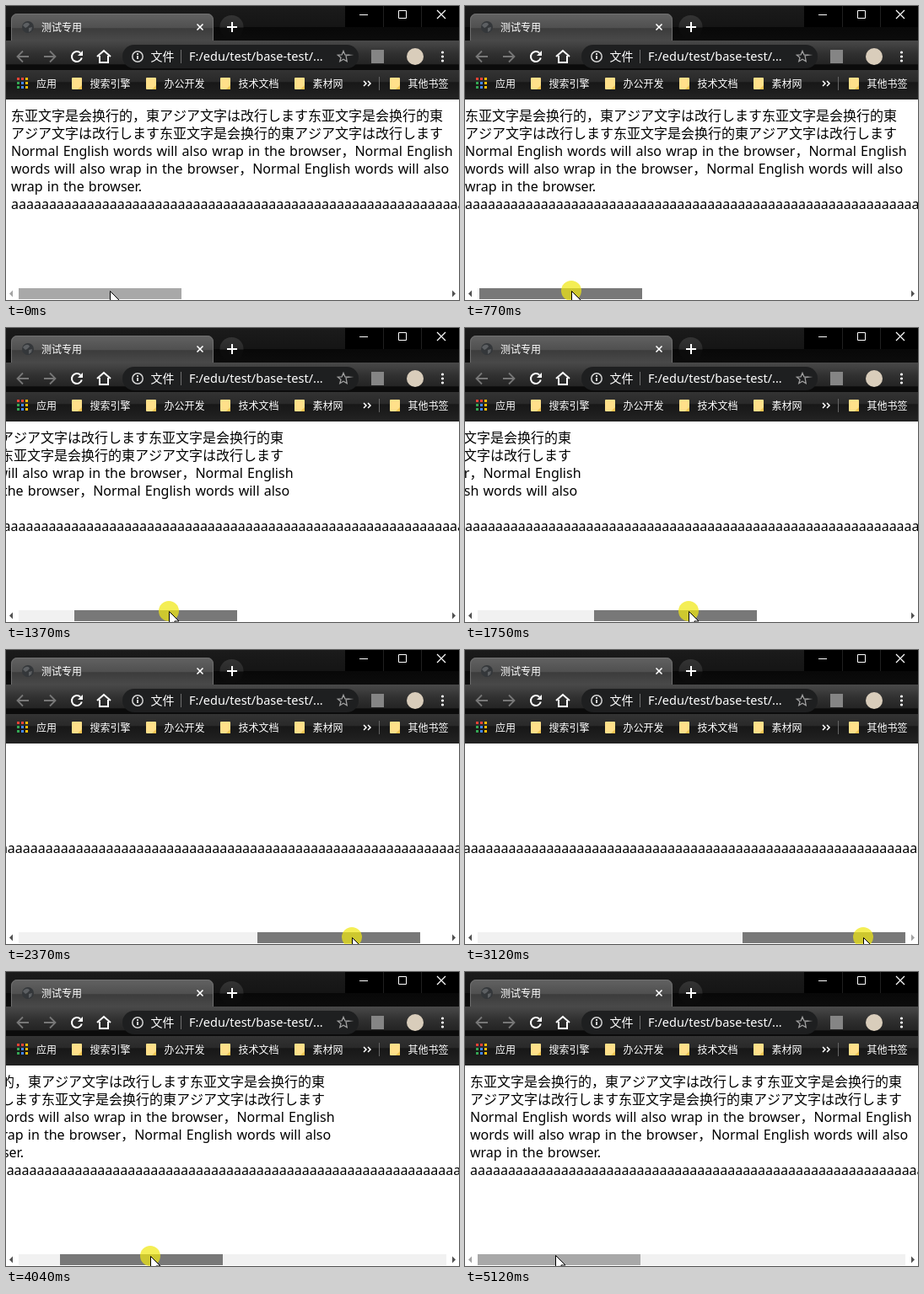
Write an HTML page with a canvas that moves like this. It is 537 px wide and 349 px high and loops after 6600 ms.

```html
<!DOCTYPE html>
<html lang="zh-CN">
<head>
<meta charset="utf-8">
<title>测试专用</title>
<style>
html, body { margin: 0; width: 100%; height: 100%; overflow: hidden; background: #fff; }
canvas { display: block; }
</style>
</head>
<body>
<canvas id="stage" width="537" height="349"></canvas>
<script>
const W = 537, H = 349, LOOP = 6600;
const ctx = document.getElementById('stage').getContext('2d');
const FONT = '"Noto Sans", "Noto Sans CJK SC", "Noto Sans CJK", sans-serif';

const TRACK = { left: 15, right: 522, top: 335, height: 13 };
const THUMB_W = 193, MAX_THUMB = TRACK.right - THUMB_W;
const MAX_SCROLL = 888;
const PRESS = 450, RELEASE = 5120;

const LINES = [
  '东亚文字是会换行的，東アジア文字は改行します东亚文字是会换行的東',
  'アジア文字は改行します东亚文字是会换行的東アジア文字は改行します',
  'Normal English words will also wrap in the browser，Normal English',
  'words will also wrap in the browser，Normal English words will also',
  'wrap in the browser.',
  'a'.repeat(158)
];

// time, pointer x, pointer y, thumb x
const PATH = [
  [0, 123, 338, 15], [690, 123, 338, 15], [770, 126, 338, 17],
  [1070, 145, 337, 34.7], [1370, 192, 336, 81], [1750, 264, 336, 153],
  [2140, 357, 339, 246], [2370, 413, 341, 302], [2500, 446, 341, 329],
  [2660, 480, 341, 329], [3040, 480, 341, 329], [3120, 472, 341, 329],
  [3270, 438, 340, 326], [3500, 372, 339, 262], [3730, 290, 338, 182],
  [4040, 171, 337, 64.5], [4270, 133, 337, 26], [4430, 123, 337, 15],
  [4580, 119, 336, 15], [4810, 107, 336, 15], [LOOP, 107, 336, 15]
];

// bursts of discrete pointer updates: start, interval, count
const BURSTS = [[0, 1, 1], [770, 75.6, 26], [3120, 76.67, 16], [4430, 1, 1], [4580, 76.67, 4]];

function snap(t) {
  const [start, gap, count] = BURSTS.filter(b => b[0] <= t).pop();
  return start + gap * Math.min(count - 1, Math.floor((t - start + 5) / gap));
}

function sample(t) {
  const i = Math.max(1, PATH.findIndex(p => p[0] >= t));
  const a = PATH[i - 1], b = PATH[i];
  const k = (t - a[0]) / (b[0] - a[0]);
  const [, x, y, thumb] = a.map((v, j) => v + (b[j] - v) * k);
  return { x: Math.round(x), y: Math.round(y), thumb };
}

function rect(x, y, w, h, fill) {
  ctx.fillStyle = fill;
  ctx.fillRect(x, y, w, h);
}

function round(x, y, w, h, r, fill) {
  ctx.beginPath();
  ctx.roundRect(x, y, w, h, r);
  ctx.fillStyle = fill;
  ctx.fill();
}

function disc(x, y, r, fill) {
  ctx.beginPath();
  ctx.arc(x, y, r, 0, Math.PI * 2);
  ctx.fillStyle = fill;
  ctx.fill();
}

function ring(x, y, r, color, width) {
  ctx.beginPath();
  ctx.arc(x, y, r, 0, Math.PI * 2);
  ctx.strokeStyle = color;
  ctx.lineWidth = width;
  ctx.stroke();
}

function shape(d, x, y, color, width) {
  const path = new Path2D(d);
  ctx.save();
  ctx.translate(x, y);
  if (width) {
    ctx.strokeStyle = color;
    ctx.lineWidth = width;
    ctx.stroke(path);
  } else {
    ctx.fillStyle = color;
    ctx.fill(path);
  }
  ctx.restore();
}

function text(str, x, y, size, color = '#fff') {
  ctx.font = `${size}px ${FONT}`;
  ctx.fillStyle = color;
  ctx.fillText(str, x, y);
}

function shade(y0, y1, ...stops) {
  const g = ctx.createLinearGradient(0, y0, 0, y1);
  stops.forEach(([at, color]) => g.addColorStop(at, color));
  return g;
}

function drawTabs() {
  rect(0, 0, W, 41, shade(0, 41, [0, '#1b1b1b'], [.6, '#151515'], [.62, '#080808'], [1, '#0c0c0c']));
  round(6, 9, 240, 36, [7, 7, 0, 0], shade(9, 42, [0, '#626262'], [.5, '#505050'], [.54, '#3c3c3c'], [1, '#4a4a4a']));
  ctx.beginPath();
  ctx.roundRect(6.5, 9.5, 239, 36, [7, 7, 0, 0]);
  ctx.strokeStyle = '#707070';
  ctx.lineWidth = 1;
  ctx.stroke();

  disc(26, 25, 7, '#34373a');
  shape('M-6-2C-3-6 1-6 2-3L-1 0L-3 1ZM1 1L5 0L4 4L1 6Z', 26, 25, '#5c5f62');
  text('测试专用', 42, 30, 12);
  shape('M-3.5-3.5L3.5 3.5M3.5-3.5L-3.5 3.5', 230, 25, '#fff', 1.6);
  disc(267.5, 25, 14, shade(11, 39, [0, '#343434'], [.5, '#292929'], [.54, '#0c0c0c'], [1, '#0c0c0c']));
  shape('M-6 0H6M0-6V6', 268, 25, '#fff', 2);

  rect(402, 0, 135, 25, '#000');
  rect(447, 0, 1, 25, '#202020');
  rect(492, 0, 1, 25, '#202020');
  rect(419, 10, 10, 1, '#fff');
  shape('M-4.5-4.5H4.5V4.5H-4.5Z', 470, 10, '#fff', 1);
  shape('M-5-5L5 5M5-5L-5 5', 516, 10, '#fff', 1.2);
}

function drawToolbar() {
  rect(0, 41, W, 35, shade(41, 76, [0, '#494949'], [.45, '#303030'], [.8, '#242424'], [.82, '#0b0b0b'], [1, '#0b0b0b']));
  const arrow = 'M7 0H-6M0-6.5L-6.5 0L0 6.5';
  shape(arrow, 20, 60, '#777', 1.8);
  shape('M-7 0H6M0-6.5L6.5 0L0 6.5', 52, 60, '#777', 1.8);
  shape('M4.2-4.2A6 6 0 1 0 5.8 1.5', 84, 60, '#fff', 2);
  shape('M7-7V-1H1Z', 84, 60, '#fff');
  shape('M-8 0L0-7L8 0M-5-1V7H5V-1', 116, 60, '#fff', 2);

  round(138, 46, 280, 28, 14, '#1e1f20');
  ring(156, 60, 6.2, '#d4d4d4', 1.5);
  rect(155, 59, 2, 4, '#d4d4d4');
  rect(155, 56, 2, 2, '#d4d4d4');
  text('文件', 171.5, 65, 14);
  rect(207, 52, 1, 16, '#707070');
  text('F:/edu/test/base-test/...', 217, 65, 14.5);
  shape('M0-6.5L1.9-2.1L6.6-1.8L3-1.2L4.2 5.7L0 3.2L-4.2 5.7L-3 1.2L-6.6-1.8L-1.9-2.1Z', 400, 60, '#a0a0a0', 1.3);

  rect(433, 52, 15, 16, '#858585');
  disc(485, 60, 10, '#d9cdbb');
  for (const y of [55, 60, 65]) disc(517.5, y, 1.6, '#fff');
}

function folder(x) {
  round(x, 85, 12, 14, 1, '#ffe08a');
  shape('M12 9V14H7Z', x, 85, '#f3c552');
}

function drawBookmarks() {
  rect(0, 76, W, 35, shade(76, 111, [0, '#333'], [.4, '#292929'], [.42, '#171717'], [1, '#232323']));
  const colors = ['#ea4335', '#ea4335', '#fbbc05', '#34a853', '#4285f4', '#fbbc05', '#34a853', '#4285f4', '#fbbc05'];
  colors.forEach((c, i) => rect(13 + i % 3 * 5, 85 + Math.floor(i / 3) * 5, 3, 3, c));
  text('应用', 36, 97, 12);
  const marks = [[78, '搜索引擎'], [166, '办公开发'], [254, '技术文档'], [342, '素材网'], [455, '其他书签']];
  for (const [x, label] of marks) {
    folder(x);
    text(label, x + 21.5, 97, 12);
  }
  shape('M-4-3L-1 0L-4 3M1-3L4 0L1 3', 428, 92, '#fff', 1.5);
  rect(442, 84, 1, 16, '#666');
}

function drawPage(scroll) {
  rect(0, 111, W, H - 111, '#fff');
  ctx.wordSpacing = '1px';
  LINES.forEach((line, i) => text(line, 6 - scroll, 136 + 21 * i, 16, '#000'));
  ctx.wordSpacing = '0px';
}

function drawScrollbar(thumb, reach, held) {
  const { left, top, height } = TRACK;
  const x = Math.floor(thumb);
  rect(left, top, reach - left, height, '#f1f1f1');
  rect(x, top, THUMB_W, height, held ? '#787878' : '#a8a8a8');
  shape('M2-4V4L-2 0Z', 6, 341.5, thumb <= left ? '#a3a3a3' : '#505050');
  shape('M-2-4V4L2 0Z', 531, 341.5, thumb >= MAX_THUMB ? '#a3a3a3' : '#505050');
}

function drawPointer(x, y, held) {
  if (held) disc(x, y, 12, 'rgba(240, 232, 20, .72)');
  const d = 'M.5 .5V16.5L4.3 13L7 19L9.4 18L6.8 12H12Z';
  shape(d, x, y, '#fff');
  shape(d, x, y, '#000', 1);
}

function draw(t) {
  const { x, y, thumb } = sample(snap(t));
  const held = t >= PRESS && t < RELEASE;
  // the visible track grows with the thumb on the way out
  const reach = t < 2500 ? Math.floor(thumb) + THUMB_W : TRACK.right;
  const scroll = Math.round((thumb - TRACK.left) / (MAX_THUMB - TRACK.left) * MAX_SCROLL);
  drawTabs();
  drawToolbar();
  drawBookmarks();
  drawPage(scroll);
  drawScrollbar(thumb, reach, held);
  drawPointer(x, y, held);
}

const start = performance.now();
function tick() {
  draw((performance.now() - start) % LOOP);
  requestAnimationFrame(tick);
}
tick();
</script>
</body>
</html>
```
